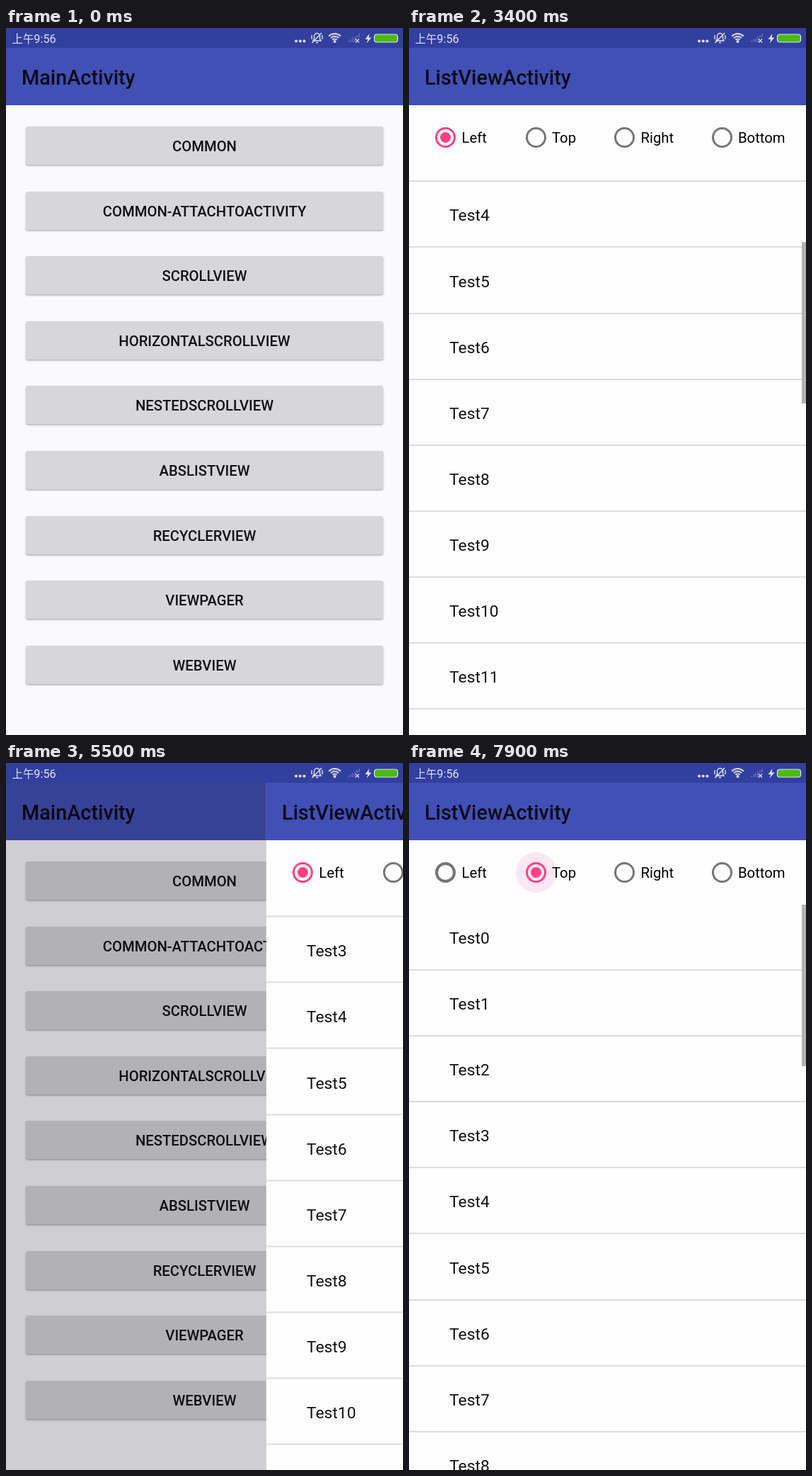
An HTML page for the animation above (8 s loop, 561 px wide and 998 px high).

```html
<!DOCTYPE html>
<html lang="en">
<head>
<meta charset="utf-8">
<title>Swipe back demo</title>
<style>
@property --x { syntax: '<number>'; inherits: true; initial-value: 561 }
@property --s { syntax: '<number>'; inherits: true; initial-value: 0 }
@property --d { syntax: '<number>'; inherits: true; initial-value: 0 }

html, body { margin: 0; width: 100%; height: 100%; overflow: hidden }
body { font-family: Roboto, sans-serif; color: #111114 }
div, i, b, span, h1 { position: absolute; display: block; box-sizing: border-box; margin: 0; white-space: nowrap }

#stage {
  width: 561px; height: 998px; overflow: hidden; background: #faf9fd;
  animation: slide 8s infinite, scroll 8s infinite, mask 8s step-end infinite;
}
.screen { left: 0; top: 28px; width: 561px; height: 970px; background: #faf9fd; overflow: hidden }
h1 {
  left: 0; top: 0; width: 561px; height: 81px; padding-left: 22px; background: #4050b4;
  font-size: 28.8px; font-weight: 500; line-height: 85.5px; color: #0b0b18;
}
#page { background: #fefefe; transform: translateX(calc(var(--x) * 1px)) }
#dim { left: 0; top: 28px; width: 561px; height: 970px; background: #000; opacity: calc(var(--d) * (1 - var(--x) / 561)) }

.btn {
  left: 28px; width: 505px; height: 54px; border-radius: 3px; background: #d7d6da;
  box-shadow: 0 1.5px 2.5px rgba(0,0,0,.3);
  font-size: 20.25px; font-weight: 500; line-height: 56px; text-align: center;
}
.btn.hit { animation: press 8s step-end infinite }

.opt { top: 112px; width: 29px; height: 29px }
.ring { inset: 0; border: 3px solid #757575; border-radius: 50% }
.dot { left: 7px; top: 7px; width: 15px; height: 15px; border-radius: 50%; background: #ff4081; transform: scale(0) }
.opt span { left: 37.5px; font-size: 20.25px; line-height: 31px; color: #000 }
.wave { left: -14px; top: -14px; width: 57px; height: 57px; border-radius: 50%; background: rgba(240,80,160,.13); transform: scale(0); animation: wave 8s step-end infinite }
.off .ring { animation: ringOff 8s step-end infinite }
.off .dot { animation: dotOff 8s step-end infinite }
.on .ring { animation: ringOn 8s step-end infinite }
.on .dot { animation: dotOn 8s step-end infinite }

#view { left: 0; top: 172px; width: 561px; height: 798px; overflow: hidden }
#list { left: 0; top: 0; transform: translateY(calc(var(--s) * -1px)) }
.row { left: 0; width: 561px; height: 93.1px; padding-left: 57px; border-bottom: 2px solid #dddde0; font-size: 22.9px; line-height: 95px }
#bar { right: 0; top: 0; width: 6px; height: 228px; background: #b2b2b2; transform: translateY(calc(var(--s) * .2875px)); animation: fade 8s step-end infinite }

#status { left: 0; top: 0; width: 561px; height: 28px; background: #333f9f }
#status svg { position: absolute; left: 0; top: 0 }

@keyframes slide {
  0% { --x: 561; animation-timing-function: step-end }
  23.75%, 86.25% { --x: 430; animation-timing-function: step-end }
  25%, 87.5% { --x: 250; animation-timing-function: step-end }
  26.25%, 88.75% { --x: 130; animation-timing-function: step-end }
  27.5%, 90% { --x: 55; animation-timing-function: step-end }
  28.75%, 91.25% { --x: 15; animation-timing-function: step-end }
  30%, 92.5%, 100% { --x: 0; animation-timing-function: step-end }
  60% { --x: 8; animation-timing-function: steps(3) }
  63.75% { --x: 91.5; animation-timing-function: steps(6) }
  71.25% { --x: 506; animation-timing-function: steps(3) }
  75% { --x: 561; animation-timing-function: step-end }
}
@keyframes scroll {
  0% { --s: 0; animation-timing-function: step-end }
  40% { --s: 90; animation-timing-function: steps(2) }
  42.5% { --s: 355; animation-timing-function: steps(2) }
  45% { --s: 445; animation-timing-function: steps(4) }
  50% { --s: 305; animation-timing-function: steps(2) }
  52.5% { --s: 270; animation-timing-function: steps(2) }
  55% { --s: 261.5; animation-timing-function: step-end }
  80%, 100% { --s: 0 }
}
@keyframes mask { 0%, 77.5%, 100% { --d: 0 } 60% { --d: .5 } }
@keyframes press {
  0%, 30%, 77.5%, 92.5%, 100% { box-shadow: 0 1.5px 2.5px rgba(0,0,0,.3) }
  21.25%, 83.75% { box-shadow: 0 3px 4px rgba(0,0,0,.33) }
}
@keyframes fade { 0%, 80%, 100% { opacity: 1 } 60% { opacity: .6 } 61.25% { opacity: .3 } 62.5% { opacity: 0 } }
@keyframes wave { 0% { transform: scale(0) } 95% { transform: scale(.5) } 96.25% { transform: scale(.8) } 97.5%, 100% { transform: scale(1) } }
@keyframes ringOff { 0% { border: 3px solid #ff4081 } 96.25%, 100% { border: 4px solid #757575 } }
@keyframes dotOff { 0% { transform: scale(1) } 96.25%, 100% { transform: scale(0) } }
@keyframes ringOn { 0% { border-color: #757575 } 96.25%, 100% { border-color: #ff4081 } }
@keyframes dotOn { 0% { transform: scale(0) } 96.25% { transform: scale(.5) } 97.5% { transform: scale(.85) } 98.75%, 100% { transform: scale(1) } }
</style>
</head>
<body>
<div id="stage">
  <div class="screen" id="main"><h1>MainActivity</h1></div>
  <div id="dim"></div>
  <div class="screen" id="page">
    <h1>ListViewActivity</h1>
    <div id="view"><div id="list"></div><i id="bar"></i></div>
  </div>
  <div id="status">
    <svg width="561" height="28" fill="none" stroke="#dfe3fa" stroke-width="1.4">
      <text x="8.5" y="20.5" fill="#dfe3fa" stroke="none" font-size="16.3" font-family="Roboto, 'Noto Sans CJK SC', 'Noto Sans CJK', sans-serif"><tspan font-size="15.4">上午</tspan>9:56</text>
      <g fill="#dfe3fa" stroke="none">
        <circle cx="410" cy="18.5" r="2"/><circle cx="415.7" cy="18.5" r="2"/><circle cx="421.4" cy="18.5" r="2"/>
        <path d="M513.5 8l-6 8h4l-2 5.500 7-8h-4z"/>
        <circle cx="464.500" cy="19" r="2"/>
      </g>
      <path d="M434 18h11l-1.500-2.500v-4a4 4 0 0 0-8 0v4zM438 20.500h3M446 7l-13.500 14M432.500 10q-1.500 3 0 6M446.500 10q1.500 3 0 6"/>
      <path d="M456 11.500q8.500-7 17 0M458.700 14q5.800-4.600 11.600 0M461.300 16.500q3.200-2.400 6.400 0" stroke-width="1.8"/>
      <path d="M484 20v-2M487 20v-4M490 20v-6M493 20v-8M496 14v-4M499 13v-5" opacity=".3"/>
      <path d="M494 15.500l5 5M499 15.500l-5 5" stroke-width="1.200"/>
      <rect x="520.500" y="9" width="33" height="11" rx="3.500" fill="#4dbb0c" stroke-width="1.200"/>
    </svg>
  </div>
</div>
<script>
const $ = id => document.getElementById(id);
function add(parent, cls, text = '', style = {}, tag = 'div') {
  const el = document.createElement(tag);
  el.className = cls;
  el.textContent = text;
  Object.assign(el.style, style);
  parent.append(el);
  return el;
}

['Common', 'Common-AttachToActivity', 'ScrollView', 'HorizontalScrollView', 'NestedScrollView',
 'AbsListView', 'RecyclerView', 'ViewPager', 'WebView'].forEach((name, i) =>
  add($('main'), name === 'AbsListView' ? 'btn hit' : 'btn', name.toUpperCase(), { top: 111 + i * 91.6 + 'px' }));

[['Left', 37, 'off'], ['Top', 164.5, 'on'], ['Right', 290, ''], ['Bottom', 427.5, '']].forEach(([name, x, state]) => {
  const opt = add($('page'), 'opt ' + state, '', { left: x + 'px' });
  if (state === 'on') add(opt, 'wave', '', {}, 'i');
  add(opt, 'ring', '', {}, 'i');
  add(opt, 'dot', '', {}, 'b');
  add(opt, '', name, {}, 'span');
});

for (let i = 0; i < 30; i++) add($('list'), 'row', 'Test' + i, { top: i * 93.1 + 'px' });
</script>
</body>
</html>
```
